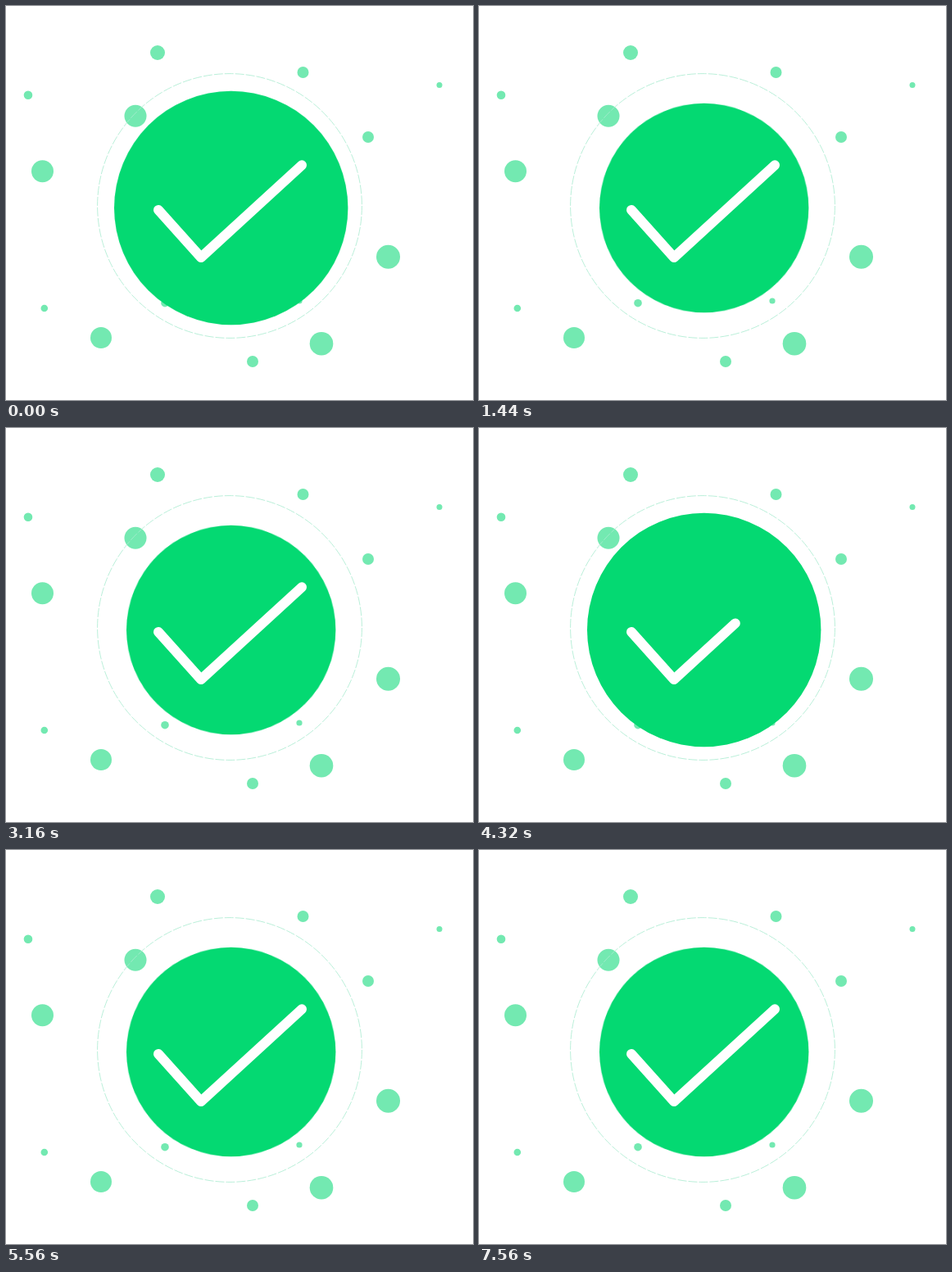
An HTML page that plays this animation: 570x481 px, repeating every 7.6 s.

```html
<!DOCTYPE html>
<html lang="en">
<head>
<meta charset="utf-8">
<title>Success check</title>
<style>
  html, body {
    margin: 0;
    width: 100%;
    height: 100%;
    overflow: hidden;
    background: #fff;
  }
  svg { display: block; }

  .dots { fill: #73e9b1; }

  .ring {
    fill: none;
    stroke: #a9ebd0;
    stroke-width: .8;
    stroke-dasharray: 11 2;
  }

  .disc {
    fill: #04d972;
    transform-origin: 274.7px 246.5px;
    animation: pulse 7.6s infinite;
  }

  .check {
    fill: none;
    stroke: #fff;
    stroke-width: 12;
    stroke-linecap: round;
    stroke-linejoin: round;
    stroke-dasharray: 1 2;
    animation: draw 7.6s infinite;
  }

  @keyframes pulse {
    0% { transform: scale(1); animation-timing-function: ease-in-out; }
    7.9%, 47.37% { transform: scale(.895); animation-timing-function: ease-in-out; }
    52.63%, 64.47% { transform: scale(1); animation-timing-function: ease-in-out; }
    72.37%, 100% { transform: scale(.895); }
  }

  /* The tick stays whole, restarts with a hard cut, then draws in. */
  @keyframes draw {
    0%, 52.62% { stroke-dashoffset: 0; }
    52.63% { stroke-dashoffset: 1; animation-timing-function: ease-in-out; }
    59.21%, 100% { stroke-dashoffset: 0; }
  }
</style>
</head>
<body>
<svg width="570" height="481" viewBox="0 0 570 481">
  <g class="dots">
    <circle cx="185" cy="57" r="9"/>
    <circle cx="362.5" cy="81" r="7"/>
    <circle cx="529" cy="96.5" r="3.5"/>
    <circle cx="27" cy="108.7" r="5.3"/>
    <circle cx="158" cy="134.2" r="13.5"/>
    <circle cx="442" cy="160" r="7"/>
    <circle cx="44.5" cy="201.7" r="13.5"/>
    <circle cx="466.5" cy="306.3" r="14.5"/>
    <circle cx="358" cy="360" r="3.6"/>
    <circle cx="194" cy="362.7" r="4.8"/>
    <circle cx="46.8" cy="369" r="4.3"/>
    <circle cx="116" cy="405" r="13"/>
    <circle cx="385" cy="412.2" r="14.3"/>
    <circle cx="301" cy="434" r="7"/>
  </g>
  <circle class="ring" cx="273" cy="244" r="161.4"/>
  <circle class="disc" cx="274.7" cy="246.5" r="142.7"/>
  <path class="check" pathLength="1" d="M186 249L238 307L361 194.3"/>
</svg>
</body>
</html>
```
